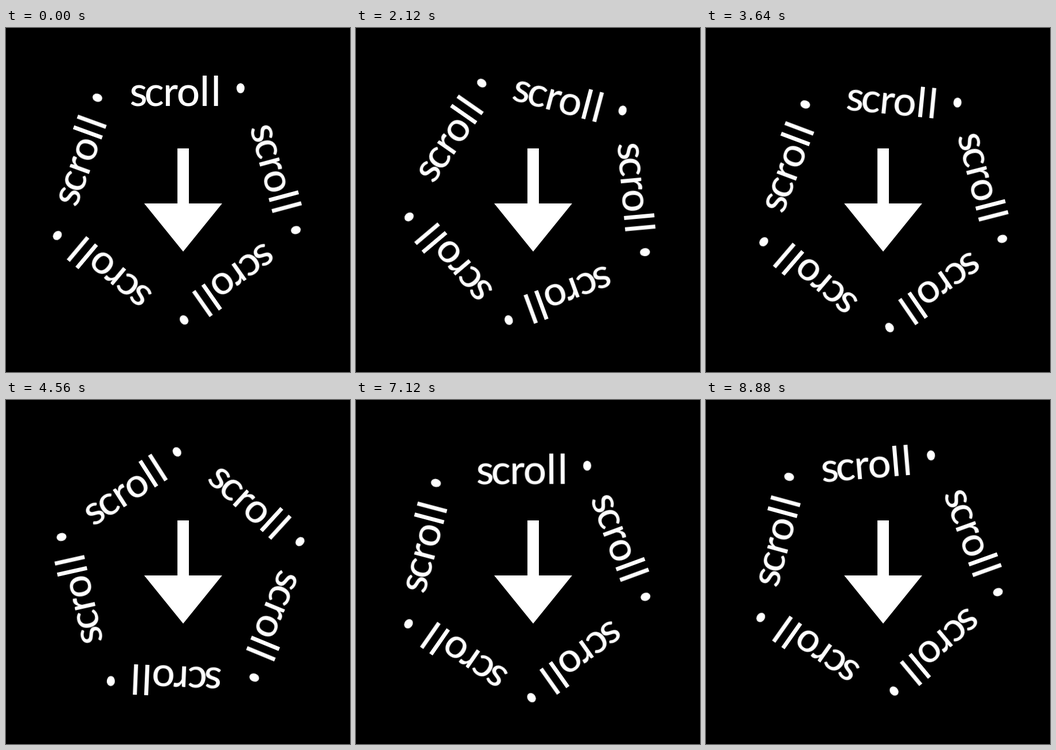
Write an HTML page that moves like this. It is 600x600 px and loops after 8920 ms.

```html
<!DOCTYPE html>
<html lang="en">
<head>
<meta charset="utf-8">
<title>Scroll</title>
<style>
  html, body { margin: 0; width: 100%; height: 100%; overflow: hidden; background: #000; }
  svg { display: block; width: 100%; height: 100%; fill: #fff; }
  #ring { transform-box: view-box; transform-origin: 300px 300px; }
  text {
    font: 500 71px Lato, "Open Sans", sans-serif;
    text-anchor: middle;
  }
</style>
</head>
<body>
<svg viewBox="0 0 600 600">
  <g id="ring"></g>
  <path d="M299 210H319V306H377L309 390L241 306H299Z"/>
</svg>
<script>
  const FRAME = 40, STEPS = 223, STEP_DEG = 1.6;
  const CENTRE = "296.1 291.6";          // middle of the words, slightly off the pivot
  const ANGLES = [0, 75, 145, 220, 290];
  const LETTER_X = [-65, -37.5, -9, 21.8, 50.4, 70.2];

  const ring = document.getElementById("ring");
  ring.innerHTML = ANGLES.map(angle => `
    <g transform="translate(${CENTRE}) rotate(${angle})">
      <text x="${LETTER_X.join(" ")}" y="-155.2">scroll</text>
      <ellipse cx="113" cy="-186.6" rx="7" ry="8.7"/>
    </g>`).join("");

  // The last step stops short of a full turn, so the loop restarts with a small jump.
  ring.animate(
    { transform: ["rotate(0deg)", `rotate(${STEPS * STEP_DEG}deg)`] },
    { duration: STEPS * FRAME, iterations: Infinity, easing: `steps(${STEPS}, end)` }
  );
</script>
</body>
</html>
```
